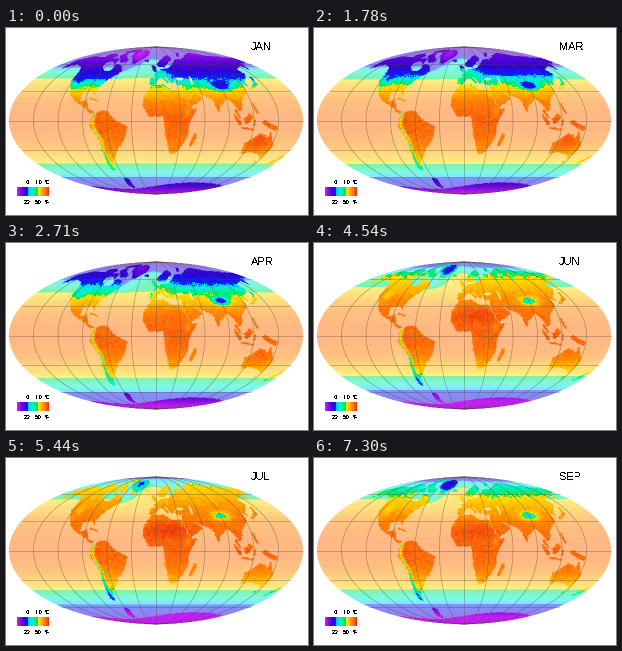
A matplotlib script for the animation above (8000 ms loop, 302 by 187 pixels).

```python
import numpy as np
import matplotlib.pyplot as plt
from matplotlib.animation import FuncAnimation
from matplotlib.path import Path

W, H, DPI = 302, 187, 100
CX, CY, RX, RY = 150, 92.5, 147, 73.5
SS = 2              # supersampling of the map
STEP, LOOP = 20, 8000
MONTHS = ["JAN", "FEB", "MAR", "APR", "MAY", "JUN", "JUL", "AUG", "SEP"]
STARTS = [0, 930, 1780, 2710, 3610, 4540, 5440, 6370, 7300]

# ---- pixel grid, inverse Mollweide projection ----
py, px = (np.mgrid[0:H * SS, 0:W * SS] + 0.5) / SS
u, v = (px - CX) / RX, (CY - py) / RY
inside = u**2 + v**2 < 1
theta = np.arcsin(np.clip(v, -1, 1))
sin_lat = np.clip((2 * theta + np.sin(2 * theta)) / np.pi, -1, 1)
lat = np.degrees(np.arcsin(sin_lat))
lon = 180 * u / np.maximum(np.cos(theta), 1e-6)

rng = np.random.default_rng(4)


def grain(size):
    shape = (-(-H * SS // size), -(-W * SS // size))
    return np.kron(rng.normal(size=shape), np.ones((size, size)))[:H * SS, :W * SS]


# ---- coastlines: a few key points, roughened by noise ----
rough_lon = lon + 0.5 * grain(3)
rough_lat = lat + 0.4 * grain(3)
points = np.column_stack([rough_lon.ravel(), rough_lat.ravel()])
land = np.zeros(lat.shape, bool)


def fill(*coords):
    ring = np.reshape(coords, (-1, 2))
    land[Path(ring).contains_points(points).reshape(land.shape)] = True


def stroke(x0, y0, x1, y1, r, value=True):
    """Round-ended stroke from one lon/lat point to another."""
    k = np.cos(np.radians((y0 + y1) / 2))
    dx, dy = (x1 - x0) * k, y1 - y0
    ox, oy = (rough_lon - x0) * k, rough_lat - y0
    t = np.clip((ox * dx + oy * dy) / (dx * dx + dy * dy), 0, 1)
    land[np.hypot(ox - t * dx, oy - t * dy) < r] = value


# Americas and Greenland
fill(-168, 66, -156, 71, -95, 69, -82, 68, -78, 60, -65, 60, -56, 52, -66, 45,
     -75, 38, -81, 30, -80, 25, -84, 30, -97, 28, -96, 19, -88, 21, -83, 9,
     -94, 16, -106, 21, -112, 27, -117, 33, -124, 41, -124, 49, -135, 58,
     -150, 60, -163, 55)
fill(-77, 8, -62, 10, -50, 0, -35, -6, -40, -20, -49, -27, -58, -38, -66, -45,
     -68, -54, -74, -50, -71, -20, -81, -5)
fill(-45, 60, -54, 68, -68, 77, -40, 83, -18, 78, -24, 69)
stroke(-84, 10, -78, 8, 1)
stroke(-84, 22, -75, 20, 0.8)
stroke(-85, 73, -66, 65, 2.5)
stroke(-120, 73, -105, 71, 2.5)
stroke(-88, 79, -70, 81, 2.5)
stroke(-90, 60, -82, 56, 4, False)
# Africa and Europe
fill(-6, 36, 10, 37, 20, 31, 33, 31, 43, 12, 51, 12, 40, -4, 40, -15, 33, -27,
     26, -34, 19, -34, 12, -17, 9, 4, -8, 4, -17, 14, -16, 24)
fill(-9, 37, -9, 43, -1, 44, -4, 48, 8, 54, 20, 55, 30, 60, 40, 66, 61, 69,
     61, 41, 28, 41, 23, 37, 14, 45, 4, 43, -1, 37)
stroke(45, -24, 49, -15, 2)
stroke(10, 60, 26, 69, 3.5)
stroke(11, 44, 17, 39, 1)
stroke(-4, 57, -1, 52, 1.8)
stroke(-21, 65, -17, 65, 1.3)
stroke(55, 72, 65, 76, 1)
# Asia
fill(60, 69, 75, 73, 104, 77, 130, 72, 181, 69, 178, 63, 163, 60, 157, 52,
     155, 59, 137, 54, 140, 48, 128, 40, 127, 35, 121, 39, 122, 30, 110, 21,
     108, 12, 103, 9, 98, 16, 91, 22, 80, 14, 77, 8, 72, 21, 57, 26, 50, 30,
     60, 22, 44, 13, 35, 28, 36, 36, 27, 37, 29, 41, 60, 41)
stroke(31, 43, 39, 43, 1.4, False)
stroke(51, 45, 51, 38, 1.4, False)
stroke(99, 10, 103, 3, 1.2)
stroke(131, 33, 141, 38, 1.2)
stroke(141, 38, 143, 44, 1.2)
# Islands and Oceania
stroke(97, 4, 104, -4, 1.6)
stroke(106, -7, 120, -9, 0.9)
stroke(111, 0, 116, 4, 3)
stroke(121, -4, 121, 0, 1)
stroke(121, 17, 125, 8, 1.3)
stroke(133, -2, 147, -8, 2.2)
fill(114, -22, 122, -18, 131, -12, 140, -17, 142, -11, 153, -26, 149, -38,
     138, -34, 130, -32, 115, -34)
stroke(146, -42, 147, -43, 1.1)
stroke(168, -46, 177, -38, 1.3)
# Antarctica
land |= rough_lat < -73 + 5 * np.cos(np.radians(lon - 90))
stroke(-60, -64, -66, -74, 2)

# ---- colours: hard breaks at 0 and 10 degrees ----
SCALE = [
    (-45, "c81efa"), (-32, "8c0af0"), (-22, "5a00dc"), (-10, "2d00d7"),
    (-0.01, "0028ff"), (0, "00c8ff"), (4, "00f5d2"), (9.99, "00e650"),
    (10, "ffe600"), (17, "ffb900"), (22, "ff8c00"), (27, "ff700a"),
    (32, "f0460a"), (37, "e11e00"),
]
STOPS = [t for t, _ in SCALE]
COLORS = np.array([[int(c[i:i + 2], 16) for i in (0, 2, 4)] for _, c in SCALE]) / 255


def colour(temp):
    return np.stack([np.interp(temp, STOPS, COLORS[:, i]) for i in range(3)], -1)


# ---- temperature model ----
texture = 0.8 * grain(2) + 0.8 * grain(6)
abs_lat = np.abs(lat)
polar = sin_lat**2


def wave(month, peak):
    return np.cos(2 * np.pi * (month - peak) / 12)


def spot(x, y, sx, sy):
    return np.exp(-((lon - x) / sx)**2 - ((lat - y) / sy)**2)


ridge = np.interp(lat, [-55, -20, -5, 10], [-72, -69, -78, -75])
andes = (np.abs(lat + 22) < 32) * np.exp(-((lon - ridge) / 2)**2)
relief = (20 * spot(90, 35, 12, 4.5) + 5 * spot(-111, 41, 6, 8)
          + 14 * spot(-42, 74, 18, 9) + 6 * spot(39, 9, 3, 4)
          + 18 * np.cos(np.radians(1.5 * lat)) * andes)
europe = spot(6, 52, 20, 10)
desert = spot(15, 21, 32, 9)
outback = spot(132, -23, 13, 7)


def land_temp(month):
    s = wave(month, 6.3)
    temp = 28 - 42 * polar**1.15 - relief + texture
    temp += s * polar * np.where(lat > 0, 24, -9)
    temp += europe * (6 - 7 * s) + desert * (3 + 3 * s) + outback * (3 - 3 * s)
    ice = -8 - 1.5 * (abs_lat - 65) - 14 * (1 + s) + texture
    return np.where(lat < -60, ice, temp)


def sea_temp(month):
    s = wave(month, 7.3)
    mild = np.where(lat > 0, 48.5 + 6.5 * s, 42.5 - 2.5 * s)
    slope = np.where(lat > 0, 0.55 - 0.22 * wave(month, 6.3), 0.6)
    temp = np.where(abs_lat < mild, 27 - 17 * (abs_lat / mild)**2,
                    10 - slope * (abs_lat - mild))
    temp += 9 * spot(-5, 63, 24, 11) - 4 * spot(-82, -15, 9, 12)
    temp -= 5 * spot(-58, 55, 12, 8)
    return np.floor(temp / 2) * 2 + 1


def world(month):
    sea = 0.5 + 0.5 * colour(sea_temp(month))
    rgb = np.where(land[..., None], colour(land_temp(month)), sea)
    rgb[~inside] = 1
    return rgb.reshape(H, SS, W, SS, 3).mean(axis=(1, 3))


maps = [world(m) for m in range(len(MONTHS))]

# ---- figure ----
fig = plt.figure(figsize=(W / DPI, H / DPI), dpi=DPI, facecolor="white")
ax = fig.add_axes([0, 0, 1, 1])
ax.axis("off")
picture = ax.imshow(maps[0], extent=(0, W, H, 0), interpolation="nearest")

grid = dict(color="#504632", lw=0.45, alpha=0.5)
arc = np.linspace(-np.pi / 2, np.pi / 2, 80)
for k in range(-5, 6):
    ax.plot(CX + RX * k / 6 * np.cos(arc), CY - RY * np.sin(arc), **grid)
for s in (-0.762, -0.404, 0, 0.404, 0.762):
    half = RX * np.sqrt(1 - s * s)
    ax.plot([CX - half, CX + half], [CY - RY * s] * 2, **grid)

# Each third of the key covers one part of the scale
key = np.interp(np.arange(32), [0, 10, 11, 20, 21, 31], [-45, -1, 0, 9.9, 10, 34])
ax.imshow(colour(key)[None], extent=(11, 43, 168.5, 159.5),
          aspect="auto", interpolation="nearest")
ax.set(xlim=(0, W), ylim=(H, 0))
ax.set_aspect("auto")


def write(x, y, text, size, align="center"):
    return ax.text(x, y, text, fontsize=size * 72 / DPI, family="Liberation Sans",
                   ha=align, va="baseline", color="black", antialiased=False)


for x, top, low in ((21.5, "0", "32"), (32.5, "10", "50"), (41, "°C", "°F")):
    write(x, 156, top, 6.3)
    write(x, 176.5, low, 6.3)
label = write(245, 22, MONTHS[0], 11, "left")


def update(i):
    now = i * STEP + STEP / 2
    month = int(np.searchsorted(STARTS, now, side="right")) - 1
    picture.set_data(maps[month])
    label.set_text(MONTHS[month])
    return picture, label


anim = FuncAnimation(fig, update, frames=LOOP // STEP, interval=STEP,
                     repeat=True, repeat_delay=0, blit=False)
plt.show()
```
